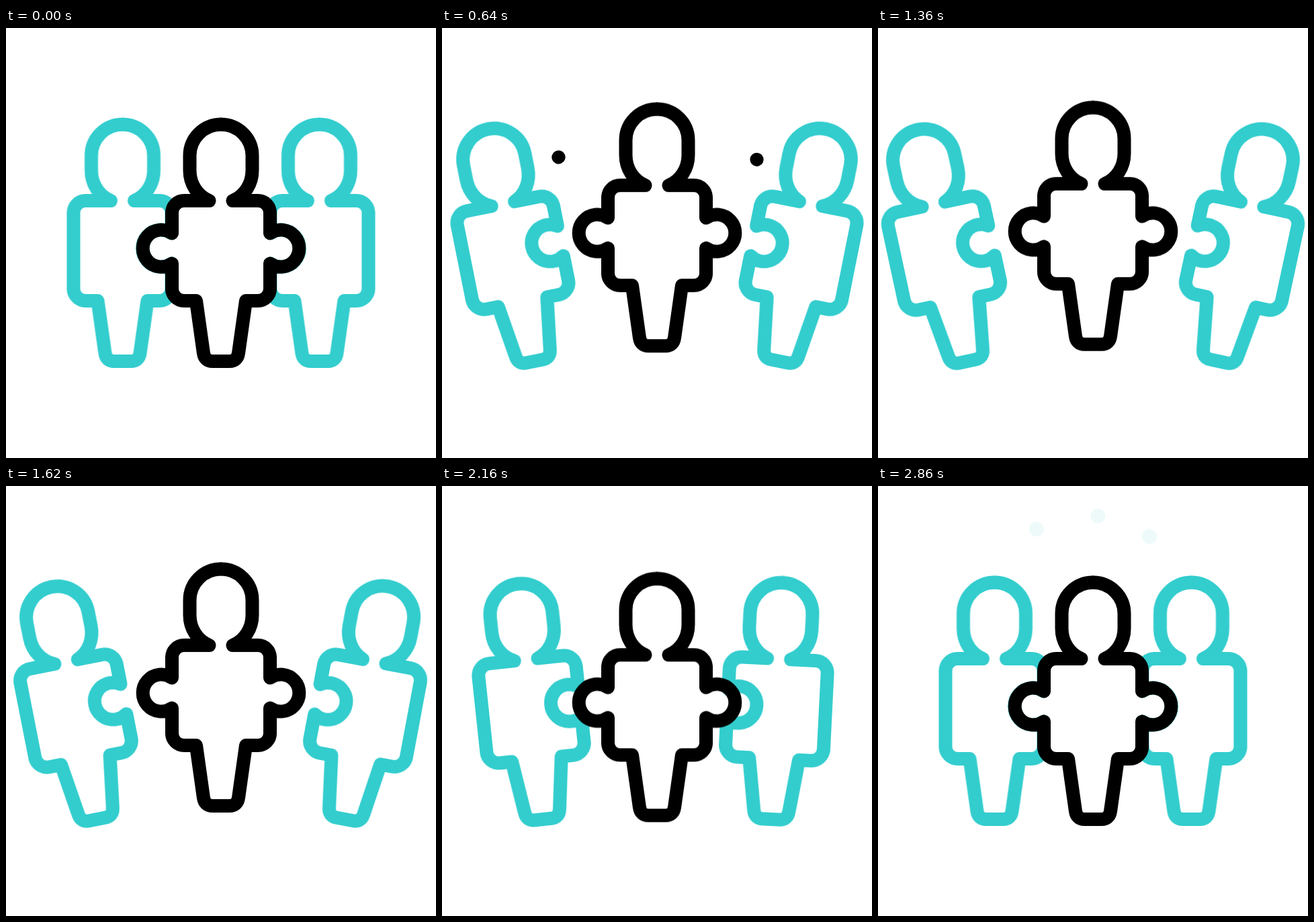
Recreate the animation shown at these times as an HTML page. Size 640 by 640 pixels, loop 3600 ms.

```html
<!DOCTYPE html>
<html lang="en">
<head>
<meta charset="utf-8">
<title>Puzzle team</title>
<style>
  html, body { margin: 0; width: 100%; height: 100%; overflow: hidden; background: #fff; }
  svg { display: block; width: 100%; height: 100%; }
  svg { fill: none; stroke: #000; stroke-width: 20; stroke-linecap: round; stroke-linejoin: round; }
  .teal { stroke: #33cdce; }

  .rise, .step, .lean, .dash, .spark { animation: 3.6s linear infinite; }
  .rise { animation-name: rise; }
  .step { animation-name: step; }
  .lean { animation-name: lean; transform-origin: 320px 496px; }
  .lean.early { animation-name: lean-early; }
  .dash { animation-name: dash; }
  .spark { animation-name: spark; stroke-width: 22; }

  @keyframes rise {
    0%, .55% { transform: translateY(0); animation-timing-function: cubic-bezier(.1, .5, .35, 1); }
    33.89% { transform: translateY(-26px); animation-timing-function: cubic-bezier(.3, 0, .4, 1); }
    79.44%, 100% { transform: translateY(0); }
  }
  @keyframes step {
    0%, .55% { transform: translateX(0); animation-timing-function: cubic-bezier(.1, .5, .35, 1); }
    33.89% { transform: translateX(-40.8px); animation-timing-function: cubic-bezier(.6, 0, .88, 1); }
    75%, 100% { transform: translateX(0); }
  }
  @keyframes lean {
    0%, .55% { transform: rotate(0deg); animation-timing-function: cubic-bezier(.07, .72, .38, 1); }
    33.89% { transform: rotate(-12.3deg); animation-timing-function: cubic-bezier(.5, 0, .85, 1); }
    75%, 100% { transform: rotate(0deg); }
  }
  @keyframes lean-early {
    0%, .55% { transform: rotate(0deg); animation-timing-function: cubic-bezier(.07, .72, .38, 1); }
    33.89% { transform: rotate(-12.3deg); animation-timing-function: cubic-bezier(.45, 0, .36, 1); }
    79.44%, 100% { transform: rotate(0deg); }
  }
  /* A stroke grows from its start, then its tail catches up */
  @keyframes dash {
    0%, 3.88% { opacity: 0; stroke-dasharray: .5 300; stroke-dashoffset: 0; }
    3.89% { opacity: 1; stroke-dasharray: .5 300; stroke-dashoffset: 0; }
    6.67% { stroke-dasharray: 34 300; stroke-dashoffset: 0; }
    11.67% { stroke-dasharray: 52 300; stroke-dashoffset: -30; }
    17.78% { stroke-dasharray: .5 300; stroke-dashoffset: -99; }
    18.32% { opacity: 1; stroke-dasharray: .5 300; stroke-dashoffset: -99; }
    18.33%, 100% { opacity: 0; stroke-dasharray: .5 300; stroke-dashoffset: -99; }
  }
  @keyframes spark {
    0%, 63.88% { opacity: 0; stroke-dasharray: .5 300; stroke-dashoffset: 0; }
    63.89% { opacity: 1; stroke-dasharray: .5 300; stroke-dashoffset: 0; }
    69.44% { stroke-dasharray: 48 300; stroke-dashoffset: -22; }
    71.5% { opacity: 1; }
    75% { stroke-dasharray: 20 300; stroke-dashoffset: -77; }
    79.44%, 100% { opacity: .08; stroke-dasharray: .5 300; stroke-dashoffset: -99; }
  }
</style>
</head>
<body>
<svg viewBox="0 0 640 640">
  <defs>
    <!-- Left half of a person, with three kinds of side -->
    <path id="half" d="M320 143.5A46.5 46.5 0 0 0 273.5 190V212C273.5 232 285 250 302.5 257H265A18 18 0 0 0 247 275
      M247 388A18 18 0 0 0 265 406H283L293.9 483.5Q295.7 496 307.5 496H320"/>
    <path id="plain" d="M247 275V388"/>
    <path id="tab" d="M247 275V305.5A27.5 27.5 0 1 0 247 350.5V388"/>
    <path id="socket" d="M247 275V305.5A27.5 27.5 0 1 1 247 350.5V388"/>
    <g id="holder">
      <use href="#half"/><use href="#plain"/>
      <g transform="matrix(-1 0 0 1 640 0)"><use href="#half"/><use href="#socket"/></g>
    </g>
    <g id="side"><use href="#half"/><use href="#tab"/></g>
  </defs>

  <g class="teal">
    <path class="spark" pathLength="100" d="M276 116Q262 78 235.5 64"/>
    <path class="spark" pathLength="100" d="M320 108Q320 70 327.5 44"/>
    <path class="spark" pathLength="100" d="M366 118Q380 86 404.5 75"/>

    <g transform="translate(-146.5 0)">
      <g class="step"><g class="lean"><use href="#holder"/></g></g>
    </g>
    <g transform="matrix(-1 0 0 1 786.5 0)">
      <g class="step"><g class="lean early"><use href="#holder"/></g></g>
    </g>
  </g>

  <path class="dash" pathLength="100" d="M236 180Q204.5 180 173 192.5"/>
  <path class="dash" pathLength="100" d="M404 180Q436.5 180 469 196"/>

  <g class="rise">
    <use href="#side"/>
    <use href="#side" transform="matrix(-1 0 0 1 640 0)"/>
  </g>
</svg>
</body>
</html>
```
